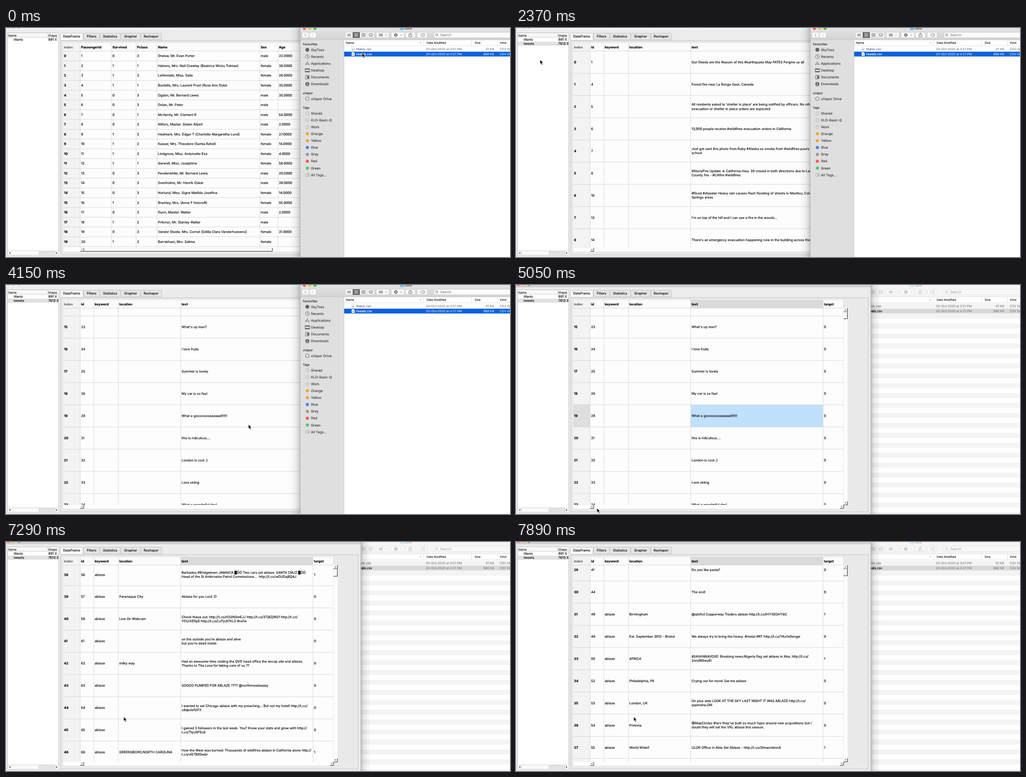
Recreate the animation shown at these times as an HTML page. Size 1108x505 px, loop 8000 ms.

```html
<!DOCTYPE html>
<html lang="en">
<head>
<meta charset="utf-8">
<title>Dragging a CSV into a data viewer</title>
<style>
html, body { margin: 0; width: 100%; height: 100%; overflow: hidden; background: #ececec; }
#stage { position: relative; width: 1108px; height: 505px; overflow: hidden; }
#stage > svg { position: absolute; left: 0; top: 0; width: 1108px; height: 505px; }
text {
  font: 7.3px Inter, "DejaVu Sans", sans-serif; color: #000; fill: currentColor; stroke: currentColor; stroke-width: .16px;
  text-rendering: geometricPrecision; white-space: pre;
}
.b { font-weight: 700; }
.dim { color: #686868; }
.head { font-size: 6.5px; color: #2c2c2c; }
.side { font-size: 7.4px; color: #3c3c3c; }
.file { font-size: 6.9px; }
.meta { font-size: 6.9px; color: #858585; }
.lit { font-size: 6.9px; color: #fff; }
.pale { font-size: 6.9px; color: #c3dafa; }
.faint { color: #adadad; }
.hint { color: #8a8a8a; }
.end { text-anchor: end; }
.mid { text-anchor: middle; }

#app, #cursor, .loaded, .unloaded, .raised, .lowered, #drag, #scroll, #thumb { animation: 8s step-end infinite; }
#files { z-index: 2; }
#cursor { z-index: 4; overflow: visible; }
#app { animation-name: front; }
.loaded { animation-name: loaded; }
.unloaded { animation-name: unloaded; }
.raised { animation-name: raised; }
.lowered { animation-name: lowered; }
#cursor { animation-name: point; }
#drag { animation-name: drag; }
#scroll { animation-name: scroll; }
#thumb { animation-name: thumb; }

@keyframes front { 0% { z-index: 1 } 53.75%, 100% { z-index: 3 } }
@keyframes loaded { 0% { opacity: 0 } 29.625%, 100% { opacity: 1 } }
@keyframes unloaded { 0% { opacity: 1 } 29.625%, 100% { opacity: 0 } }
@keyframes raised { 0% { opacity: 0 } 53.75%, 100% { opacity: 1 } }
@keyframes lowered { 0% { opacity: 1 } 53.75%, 100% { opacity: 0 } }
@keyframes drag { 0% { opacity: 0 } 3.625% { opacity: 1 } 18.5% { opacity: .5 } 20.375%, 100% { opacity: 0 } }
@keyframes thumb { 0% { transform: none } 87.375% { transform: translateY(1px) } 94.875%, 100% { transform: none } }
@keyframes scroll {
  0% { transform: translateY(0) }
  40.875% { transform: translateY(-60px) }
  42.625% { transform: translateY(-260px) }
  44.375% { transform: translateY(-560px) }
  46.25% { transform: translateY(-716.9px) }
  85.5% { transform: translateY(-1290px) }
  87.375% { transform: translateY(-1912px) }
  91.125% { transform: translateY(-1863.6px) }
  93% { transform: translateY(-1750px) }
  94.875% { transform: translateY(-1600px) }
  96.75% { transform: translateY(-1490px) }
  98.625%, 100% { transform: translateY(-1433.6px) }
}
@keyframes point {
  0% { transform: translate(783px, 55px) }
  3.625% { transform: translate(750px, 60px) }
  5.5% { transform: translate(620px, 76px) }
  7.375% { transform: translate(430px, 91px) }
  9.25% { transform: translate(240px, 96px) }
  11.125% { transform: translate(120px, 91px) }
  13% { transform: translate(61px, 77px) }
  14.875% { transform: translate(55px, 72px) }
  16.625% { transform: translate(53px, 70px) }
  31.5% { transform: translate(72px, 84px) }
  33.375% { transform: translate(190px, 150px) }
  35.25% { transform: translate(370px, 240px) }
  37.125% { transform: translate(500px, 296px) }
  39% { transform: translate(533px, 307.5px) }
  55.625% { transform: translate(390px, 390px) }
  57.5% { transform: translate(192px, 487px) }
  61.25% { transform: translate(188px, 490px) }
  63.125% { transform: translate(178px, 492px) }
  65% { transform: translate(166px, 494px) }
  66.875% { transform: translate(154px, 495px) }
  68.75% { transform: translate(147px, 494px) }
  70.5% { transform: translate(143px, 494px) }
  74.25% { transform: translate(156px, 494px) }
  76.125% { transform: translate(170px, 494px) }
  79.875% { transform: translate(205px, 455px) }
  81.75% { transform: translate(246px, 404px) }
  83.625%, 100% { transform: translate(258.7px, 385.5px) }
}
</style>
</head>
<body>
<div id="stage">
  <svg id="app"></svg>
  <svg id="files"></svg>
  <svg id="cursor"></svg>
</div>
<script>
const people = `0|3|Drelow, Mr. Evan Porter|male|22
1|1|Halvers, Mrs. Neil Crawley (Beatrice Wicks Tolman)|female|38
1|3|Lehtomaki, Miss. Saila|female|26
1|1|Bontelle, Mrs. Laurent Frost (Rosa Ann Dole)|female|35
0|3|Ogden, Mr. Bernard Lewis|male|35
0|3|Dolan, Mr. Peter|male|
0|1|McVarnly, Mr. Clement R|male|54
0|3|Nilfors, Master. Sixten Albert|male|2
1|3|Hedmark, Mrs. Edgar T (Charlotte Margaretha Lund)|female|27
1|2|Kassar, Mrs. Theodore (Samia Rahel)|female|14
1|3|Lindgrove, Miss. Antoinette Eva|female|4
1|1|Garwell, Miss. Josephine|female|58
0|3|Penderwhite, Mr. Bernard Lewis|male|20
0|3|Svenholms, Mr. Henrik Oskar|male|39
0|3|Norlund, Miss. Signe Matilda Josefina|female|14
1|2|Bramley, Mrs. (Anne F Holcroft)|female|55
0|3|Dunn, Master. Walter|male|2
1|2|Pritchor, Mr. Stanley Walter|male|
0|3|Vander Stoele, Mrs. Cornel (Odilia Clara Vanderhoevens)|female|31
1|3|Barrakhani, Mrs. Salima|female|`.split('\n').map((row, i) => {
  const [alive, cls, name, sex, age] = row.split('|');
  return [i + 1, alive, cls, name, sex, age && age + '.0000'];
});

// id | target | location | text, where ¶ breaks a line
const tweets = `1|1||Our Deeds are the Reason of this #earthquake May FATES Forgive us all
4|1||Forest fire near La Ronge Sask. Canada
5|1||All residents asked to 'shelter in place' are being notified by officers. No other¶evacuation or shelter in place orders are expected
6|1||13,000 people receive #wildfires evacuation orders in California
7|1||Just got sent this photo from Ruby #Alaska as smoke from #wildfires pours into a¶school
8|1||#StonyFire Update => California Hwy. 20 closed in both directions due to Lake¶County fire - #CAfire #wildfires
10|1||#flood #disaster Heavy rain causes flash flooding of streets in Manitou, Colorado¶Springs areas
13|1||I'm on top of the hill and I can see a fire in the woods...
14|1||There's an emergency evacuation happening now in the building across the street
15|1||I'm afraid that the tornado is coming to our area...
16|1||Three people died from the heat wave so far
17|1||Haha South Tampa is getting flooded hah- WAIT A SECOND I LIVE IN¶SOUTH TAMPA WHAT AM I GONNA DO #flooding
18|1||#raining #flooding #Florida #TampaBay #Tampa 18 or 19 days. I've lost count
19|1||#Flood in Bago Myanmar #We arrived Bago
20|1||Damage to school bus on 80 in multi car crash #BREAKING
23|0||What's up man?
24|0||I love fruits
25|0||Summer is lovely
26|0||My car is so fast
28|0||What a goooooooaaaaaal!!!!!!
31|0||this is ridiculous....
32|0||London is cool ;)
33|0||Love skiing
34|0||What a wonderful day!
36|0||LOOOOOOL
37|0||No way...I can't eat that
38|0||Was in NYC last week!
39|0||Love my girlfriend
40|0||Cooool :)
41|0||Do you like pasta?
44|0||The end!
48|1|Birmingham|@qlofnd Copperway Traders ablaze http://t.co/lHYXEOHY6C
49|0|Est. September 2012 - Bristol|We always try to bring the heavy. #metal #RT http://t.co/YAo1e0xngw
50|1|AFRICA|#SAVANNAVOXE: Breaking news:Nigeria flag set ablaze in Aba. http://t.co/¶2nndBGwyEi
52|0|Philadelphia, PA|Crying out for more! Set me ablaze
53|0|London, UK|On plus side LOOK AT THE SKY LAST NIGHT IT WAS ABLAZE http://t.co/¶qqsmshaJ3N
54|0|Pretoria|@MapCircles #lorv they've built so much hype around new acquisitions but I¶doubt they will set the VKL ablaze this season.
55|1|World Wide!!|ULOR Office in Abia Set Ablaze - http://t.co/3ImaomknnA
56|1||Barbados #Bridgetown JAMAICA ▓ÛÒ Two cars set ablaze: SANTA CRUZ ▓ÛÓ¶Head of the St Ambrosine Patrol Commissione...  http://t.co/wDUEaj8Q4J
57|0|Paranaque City|Ablaze for you Lord :D
59|0|Live On Webcam|Check these out: http://t.co/rOI2NSmEJJ http://t.co/3Tj8ZjiN21 http://t.co/¶YDUiXEfIpE http://t.co/LxTjc87KLS #nsfw
61|0||on the outside you're ablaze and alive¶but you're dead inside
62|0|milky way|Had an awesome time visiting the QVD head office the ancop site and ablaze.¶Thanks to Tita Luna for taking care of us ??
63|0||SOOOO PUMPED FOR ABLAZE ???? @northmeadowjoy
64|0||I wanted to set Chicago ablaze with my preaching... But not my hotel! http://t.co/¶o9qknbfOFX
65|0||I gained 3 followers in the last week. You? Know your stats and grow with http://¶t.co/TIyUliF5c6
66|1|GREENSBORO,NORTH CAROLINA|How the West was burned: Thousands of wildfires ablaze in California alone http://¶t.co/vl5TBR3wbr
67|0||Building the perfect tracklist to life leave the streets ablaze`.split('\n').map((row, i) => {
  const [id, target, place, message] = row.split('|');
  return [id, i > 30 ? 'ablaze' : '', place, message, target];
});

const $ = id => document.getElementById(id);
const rect = (x, y, w, h, fill, more = '') => `<rect x="${x}" y="${y}" width="${w}" height="${h}" fill="${fill}" ${more}/>`;
const dot = (x, y, r, fill, more = '') => `<circle cx="${x}" cy="${y}" r="${r}" fill="${fill}" ${more}/>`;
const path = (d, stroke, more = '') => `<path d="${d}" fill="none" stroke="${stroke}" ${more}/>`;
const group = (cls, inner) => `<g class="${cls}">${inner}</g>`;
const each = (list, fn) => list.map(fn).join('');

// y is the middle of the text block
function text(x, y, str, cls = '') {
  const lines = String(str).split('¶');
  return each(lines, (s, i) =>
    `<text x="${x}" y="${y + 2.65 + (i - (lines.length - 1) / 2) * 9.2}" class="${cls}">${s}</text>`);
}

const lights = (x, y, colors) => each(colors, (c, i) => dot(x + i * 11.7, y, 3.4, c));
const gray = ['#d2d2d2', '#d2d2d2', '#d2d2d2'];
const lit = ['#fc5b57', '#fdbc2e', '#29c840'];

// raised button with dark lower and right edges
function knob(x, y, w, h, arrow = '') {
  return rect(x, y, w, h, '#f8f8f8') + path(`M${x} ${y + h - .5}h${w - .5}v${-h + .5}`, '#222') +
    (arrow && `<path d="M${x + w / 2 - .5} ${y + h / 2 - .5}${arrow}z" fill="#333"/>`);
}
const arrows = { left: 'm-1.3 0l2.2-1.6v3.2', right: 'm1.3 0l-2.2-1.6v3.2', up: 'm0-1.3l-1.6 2.2h3.2', down: 'm0 1.3l-1.6-2.2h3.2' };

function grid(cols, names, rows, pitch, marks = ['', '']) {
  const right = 720, top = 51;
  const mid = i => top + pitch * (i + .5) - .1;
  const body = rect(126, top, 37, rows.length * pitch, '#f3f3f3') + marks[1] +
    each(rows, (row, i) =>
      path(`M126 ${top + pitch * (i + 1)}H${right}`, '#d6d6d6') +
      text(127.5, mid(i), i, 'b') + each(row, (cell, k) => cell === '' ? '' : text(cols[k] + 2, mid(i), cell)));
  return {
    head: rect(126, 33, 594, 18, '#fbfbfb') + rect(126, 33, 37, 18, '#f3f3f3') + marks[0] +
      text(127.5, 42, 'index', 'b dim') + each(names, (n, k) => text(cols[k] + 2, 42, n, 'b')),
    body,
    lines: path('M126 51H720' + each(cols.concat(right), x => `M${x} 33V485`), '#d6d6d6')
  };
}

const clip = (x, y, w, h, inner) =>
  `<svg x="${x}" y="${y}" width="${w}" height="${h}" viewBox="${x} ${y} ${w} ${h}" overflow="hidden">${inner}</svg>`;
const view = inner => clip(126, 51, 594, 434, inner);

function drawApp() {
  const first = grid([163, 232, 286, 332, 558, 598],
    ['PassengerId', 'Survived', 'Pclass', 'Name', 'Sex', 'Age'], people, 21.55);
  const pitch = 48.95, row = 51 + 19 * pitch;
  const second = grid([163, 193, 247, 384, 675], ['id', 'keyword', 'location', 'text', 'target'], tweets, pitch, [
    group('raised', rect(384, 33, 291, 18, '#dadada')),
    group('raised', rect(126, row, 37, pitch, '#dedede') + rect(384, row, 291, pitch, '#c0e0fb'))
  ]);
  const tabs = [['DataFrame', 119, 50.5], ['Filters', 170, 36], ['Statistics', 206, 46], ['Grapher', 252, 44], ['Reshaper', 296, 46]];

  $('app').innerHTML =
    `<defs><linearGradient id="shadeR"><stop stop-color="#000" stop-opacity=".22"/><stop offset=".35" stop-color="#000" stop-opacity=".08"/><stop offset="1" stop-color="#000" stop-opacity="0"/></linearGradient></defs>` +
    group('raised', rect(780, 0, 22, 505, 'url(#shadeR)')) +
    rect(0, 0, 780, 505, '#ececec') +
    group('lowered', rect(0, 0, 780, 3.5, '#f5f5f5') + lights(5, -1.5, gray) + text(390, -2.4, 'PandasGUI', 'mid faint')) +
    group('raised', rect(0, 0, 780, 4, '#d4d4d4') + path('M0 4H780', '#b8b8b8') + lights(5, -1.5, lit) +
      text(390, -2.4, 'PandasGUI', 'mid dim') + path('M780 0V505', '#b0b0b0')) +
    // dataset list
    rect(3.5, 10.5, 112.5, 490.5, '#fff', 'stroke="#bdbdbd"') +
    rect(4, 11, 111.5, 9.5, '#f7f7f7') + path('M4 20.5H116M91.5 11V20', '#cfcfcf') +
    text(5, 16, 'Name', 'head') + text(92.5, 16, 'Shape', 'head') +
    clip(4, 11, 112, 480, text(17, 25.5, 'titanic') + text(93, 25.5, '891 X') +
      group('loaded', rect(4, 30, 112, 9, '#e1e1e1') + text(17, 34.5, 'tweets') + text(93, 34.5, '7613 X'))) +
    rect(4, 491.5, 111.5, 9, '#fafafa') + rect(72, 492, 35, 8.5, '#e2e2e2') +
    path('M4 491.5H116M12.5 492V501M72.5 492V501M107.5 492V501', '#d2d2d2') +
    '<path d="M6.5 496.3l3-2v4zM113 496.3l-3-2v4z" fill="#333"/>' +
    // tabs and panel
    rect(120.5, 28, 654, 472.5, '#e9e9e9', 'stroke="#c2c2c2"') +
    each(tabs, ([name, x, w], i) =>
      rect(x + .5, 11.5, w - .5, i ? 14.5 : 16, i ? '#e5e5e5' : '#f8f8f8', 'stroke="#c2c2c2" rx="1"') +
      text(x + w / 2, 18.8, name, 'mid')) +
    rect(126, 33, 594, 460, '#fdfdfd') +
    group('unloaded', first.head + view(first.body) + first.lines + knob(171, 485, 415, 8)) +
    group('loaded', rect(126, 33, 594, 460, '#fdfdfd') + second.head +
      view(`<g id="scroll">${second.body}</g>`) + second.lines +
      rect(720, 51, 9, 434, '#fcfcfc') + knob(720, 51, 9, 8.5, arrows.up) +
      `<g id="thumb">${knob(720, 59.5, 9, 15.5)}</g>` + knob(720, 477, 9, 8.5, arrows.down) +
      knob(712, 485, 8.5, 8, arrows.right)) +
    knob(163, 485, 8.5, 8, arrows.left);
}

function docIcon(x, y) {
  return `<path d="M${x} ${y - 4}h4.3l2.2 2.2v5.8h-6.5z" fill="#fff" stroke="#b5b5b5" stroke-width=".5"/>` +
    rect(x + 1.6, y - .4, 3, 2.2, '#6aa584');
}

function toolbar(active) {
  const ink = active ? '#5f5f5f' : '#b9b9b9', edge = active ? '#c0c0c0' : '#e0e0e0', face = active ? '#fbfbfb' : '#f8f8f8';
  const box = (x, w) => rect(x, 9.5, w, 12, face, `stroke="${edge}" stroke-width=".7" rx="2"`);
  const s = 'stroke-width=".9"';
  const six = (x, y, step, w, h) => each([0, 1, 2, 3, 4, 5], i => rect(x + i % 3 * step, y + (i > 2) * 3.2, w, h, ink));
  return rect(647, 0, 461, 26, active ? 'url(#bar)' : '#f5f5f5') + path('M647 26.2H1108', active ? '#b9b9b9' : '#dadada', s) +
    lights(656, .5, active ? lit : gray) +
    rect(866, -4, 9.5, 8.5, active ? '#6fc0ea' : '#cde6f4', 'rx="1"') + text(877, .5, 'data', active ? 'side' : 'side faint') +
    box(651, 15) + box(667, 15) + path('M660 12.5l-3 3 3 3', ink, s) + path('M673 12.5l3 3-3 3', edge, s) +
    box(746, 64) + rect(762, 9.2, 16, 12.6, active ? '#6a6a6a' : '#d0d0d0') + path('M794 10v11', edge, s) +
    six(750.5, 13, 2.8, 1.9, 2) +
    path('M766 12.7h8M766 15.3h8M766 17.9h8', '#fff', s) +
    path('M782 12.5h8v6h-8zM784.7 12.5v6M787.3 12.5v6', ink, s) +
    path('M798 12.5h8v3.6h-8zM798 18.2h8', ink, s) +
    box(814, 28) + box(847, 29) + box(878, 22) + box(904, 22) + box(941, 180) +
    six(820, 12.8, 3, 2.1, 2.2) +
    path('M833.5 14.5l2 2 2-2M867 14.5l2 2 2-2', ink, s) +
    dot(857, 15.5, 2.4, 'none', `stroke="${ink}" stroke-width="1.6"`) +
    dot(857, 15.5, 3.6, 'none', `stroke="${ink}" stroke-width="1" stroke-dasharray="1.4 1.43"`) +
    path('M887.5 14h-1.8v5.2h6.6v-5.2h-1.8M889 17v-5.5M887 13l2-2 2 2', ink, s) +
    path('M911 15.5l2.5-2.6h6v5.2h-6z', ink, s) +
    dot(946.7, 14.8, 2.2, 'none', `stroke="${ink}" ${s}`) + path('M948.3 16.5l2 2', ink, s) +
    text(954.5, 15.5, 'Search', active ? 'side hint' : 'side faint');
}

function fileList(active) {
  const row = (y, name, time, size, a, b) => docIcon(760, y) + text(770, y, name, a) +
    text(923, y, `20-Oct-2020 at ${time} PM`, b) + text(1073, y, size, b + ' end') + text(1085.5, y, 'CSV Document', b);
  let stripes = '';
  if (!active) for (let y = 41.4; y < 505; y += 21.9) stripes += rect(743, y, 365, 10.95, '#f4f4f4');
  return rect(743, 26.7, 365, 480, '#fff') + stripes +
    path('M743 39.3H1108M918 27V39M1023.5 27V39M1080.5 27V39', '#d9d9d9', 'stroke-width=".8"') +
    text(747, 32.8, 'Name', 'head') + path('M909 34l2-2 2 2', '#777', 'stroke-width=".8"') +
    text(924.5, 32.8, 'Date Modified', 'head') + text(1030, 32.8, 'Size', 'head') + text(1086, 32.8, 'Kind', 'head') +
    rect(743, 52.2, 365, 10.6, active ? '#0a60dd' : '#d9d9d9') +
    row(46.3, 'titanic.csv', '3:51', '61 KB', 'file dim', 'meta') +
    row(57.4, 'tweets.csv', '4:21', '988 KB', active ? 'lit' : 'file', active ? 'pale' : 'meta');
}

function sidebar() {
  const ink = '#626262', s = 'stroke-width=".9"', x = 662.5;
  const ring = (y, r = 4) => dot(x, y, r, 'none', `stroke="${ink}" ${s}`);
  const places = ['SkyToss', 'Recents', 'Applications', 'Desktop', 'Documents', 'Downloads'];
  const tags = [['Shared'], ['KLD-Basic-Q'], ['Work'], ['Orange', '#f7a03a'], ['Yellow', '#f7a03a'], ['Blue', '#3b87f7'],
    ['Gray', '#98989c'], ['Red', '#fc5753'], ['Green', '#53c965']];
  return rect(647, 26.7, 96, 480, '#dfdfe0') + path('M743 27V505', '#c9c9c9', s) +
    text(652.5, 35, 'Favourites', 'head dim') + each(places, (p, i) => text(670.5, 48 + i * 15.15, p, 'side')) +
    dot(x, 48, 4.3, ink) +
    ring(63.1, 4.3) + path('M662.5 60v3.3h2.6', ink, s) +
    path('M658.5 82l4-8 4 8M657.5 79.6h10', ink, s) +
    rect(657.8, 89.7, 9.6, 7.4, 'none', `stroke="${ink}" ${s}`) + rect(657.8, 90, 9.6, 1.8, ink) + rect(658, 95, 9.4, 2, ink) +
    path('M658.4 105h4v7.5h-4zM660.5 104.5h5.8v7.5h-4', ink, s) + rect(663, 106, 3, 5, ink) +
    dot(x, 123.8, 4.5, ink) + path('M662.5 121v5M660.4 124.1l2.1 2.1 2.1-2.1', '#eee', s) +
    text(652.5, 143, 'uVapor', 'head dim') + ring(156) + text(670.5, 156, 'uVapor Drive', 'side') +
    text(652.5, 175, 'Tags', 'head dim') +
    each(tags, ([name, color], i) => {
      const y = 188 + i * 15.12;
      return dot(x, y, 3.5, color || '#dcdcdc', color ? '' : 'stroke="#a6a6a6" stroke-width=".8"') + text(670.5, y, name, 'side');
    }) +
    dot(664, 324, 3.3, '#cfcfcf', 'stroke="#999" stroke-width=".7"') + dot(661.5, 324, 3.3, '#dcdcdc', 'stroke="#999" stroke-width=".7"') +
    text(670.5, 324, 'All Tags...', 'side');
}

function drawFiles() {
  $('files').innerHTML =
    `<defs><linearGradient id="shadeL"><stop stop-color="#000" stop-opacity="0"/><stop offset=".6" stop-color="#000" stop-opacity=".07"/><stop offset="1" stop-color="#000" stop-opacity=".22"/></linearGradient>
    <linearGradient id="bar" x2="0" y2="1"><stop stop-color="#e4e4e4"/><stop offset="1" stop-color="#d3d3d3"/></linearGradient></defs>` +
    group('raised', toolbar(false) + fileList(false)) +
    group('lowered', rect(624, 0, 23, 505, 'url(#shadeL)') + toolbar(true) + fileList(true) + sidebar() +
      path('M647 0V505', '#b4b4b4', 'stroke-width=".8"'));
}

function drawCursor() {
  $('cursor').innerHTML =
    '<g id="drag">' + docIcon(-23, 1.2) + rect(-14, -3.6, 41, 9.6, '#1a66df', 'rx="4.8"') + text(-12.5, 1.2, 'tweets.csv', 'lit') +
    dot(1, -1, 6, 'none', 'stroke="#27374d" stroke-width=".9"') +
    dot(5, 12, 5.6, '#1fa51f') + path('M2 12h6M5 9v6', '#fff', 'stroke-width="1.5"') + '</g>' +
    '<path d="M0 0v9.6l2.2-2 1.7 3.9 1.8-.8-1.7-3.8h3z" fill="#000" stroke="#fff" stroke-width=".7"/>';
}

drawApp();
drawFiles();
drawCursor();
</script>
</body>
</html>
```
